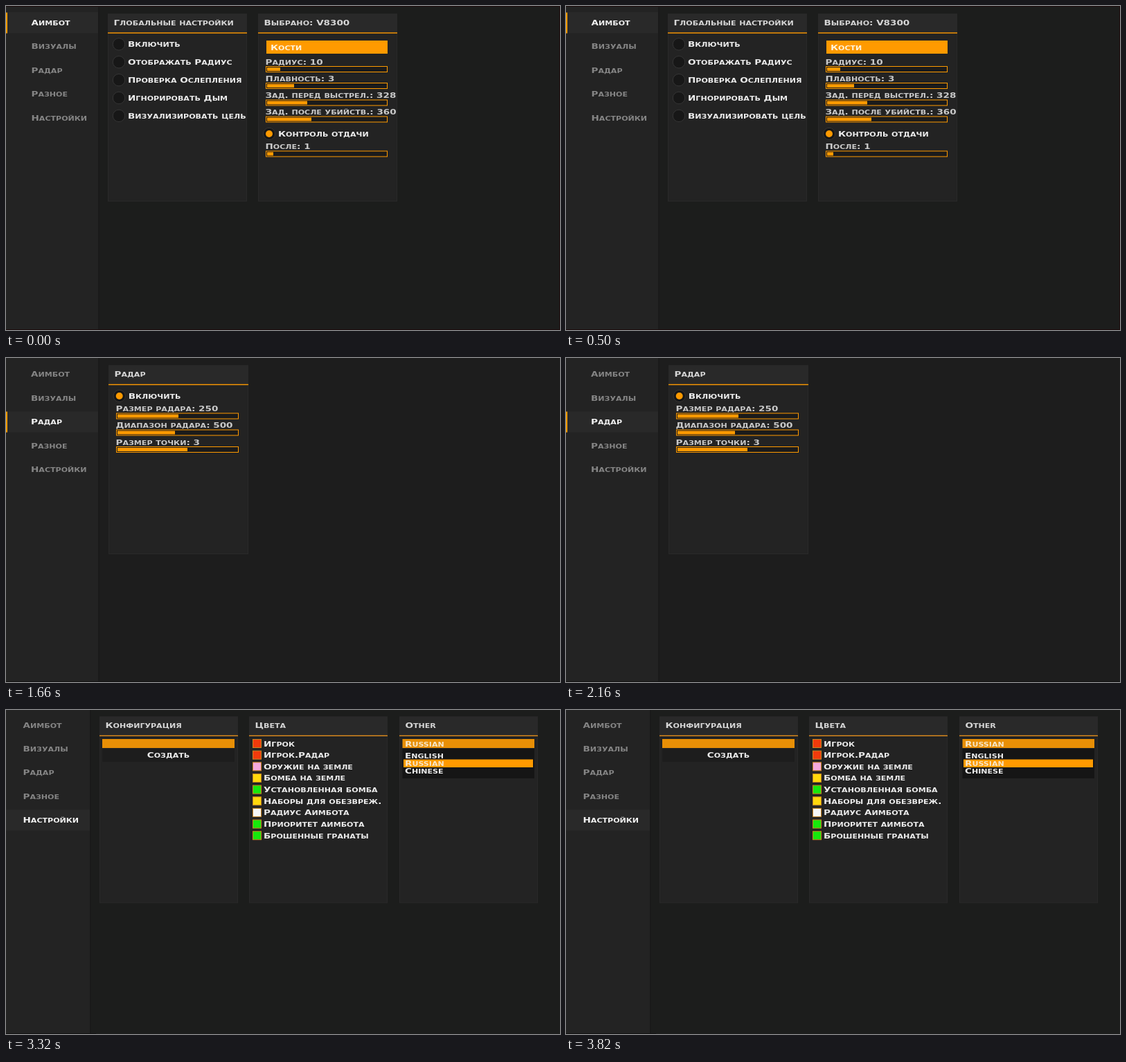
Animation of 800x469 px, one loop 4150 ms. Source, as an HTML page:

```html
<!DOCTYPE html>
<html lang="ru">
<head>
<meta charset="utf-8">
<title>Меню настроек</title>
<style>
html, body { margin: 0; width: 100%; height: 100%; overflow: hidden; background: #1d1d1d; }
svg { display: block; width: 100vw; height: 100vh; }
text { font: bold 11px "DejaVu Sans", sans-serif; white-space: pre; }
.low { font-size: 9px; text-transform: uppercase; }
</style>
</head>
<body>
<svg id="stage" viewBox="0 0 800 469" preserveAspectRatio="none"></svg>
<script>
const HOLD = 830;
const WIDE = 1.23;
const ORANGE = '#ff9a00';
const MENU = ['Аимбот', 'Визуалы', 'Радар', 'Разное', 'Настройки'];
const RED = '#f03a0c', YELLOW = '#ffd80c', GREEN = '#18e80c';

const rect = (x, y, w, h, fill, extra = '') =>
  `<rect x="${x}" y="${y}" width="${w}" height="${h}" fill="${fill}" ${extra}/>`;

// Wide small capitals, centred vertically on y
function label(x, y, str, fill = '#ececec', anchor = 'start') {
  const runs = str.split(/([а-яёa-z]+)/).filter(Boolean)
    .map(s => `<tspan${/[а-яёa-z]/.test(s) ? ' class="low"' : ''}>${s}</tspan>`).join('');
  return `<text transform="translate(${x} ${y + 4}) scale(${WIDE} 1)" fill="${fill}" text-anchor="${anchor}">${runs}</text>`;
}

function radio(x, y, str, on) {
  return `<circle cx="${x}" cy="${y}" r="8.7" fill="#171717" stroke="#353535"/>` +
    (on ? `<circle cx="${x}" cy="${y}" r="5" fill="${ORANGE}"/>` : '') +
    label(x + 13, y, str);
}

const radios = (x, y, names) => names.map((s, i) => radio(x, y + i * 25.9, s)).join('');

function slider(x, y, w, fill, str) {
  return label(x - .5, y - 6.5, str, '#c9c9c9') +
    rect(x + .5, y + .5, w - 1, 8, '#1b1b1b', `stroke="${ORANGE}"`) +
    rect(x + 2, y + 2, fill, 5, ORANGE);
}

function panel(x, y, w, bottom, line, title, tone = ORANGE) {
  return rect(x + .5, y + .5, w - 1, bottom - y - 1, '#232323', 'stroke="#292929"') +
    rect(x, y, w, line - y, '#292929') +
    rect(x, line - .7, w, 1.4, tone) +
    label(x + 8.5, y + 12.5, title, '#d6d6d6');
}

function sidebar(w, x, y, active, bar) {
  const step = 34.4;
  const mid = y + active * step;
  return rect(0, 0, w, 469, '#232323') +
    rect(w, 0, 2, 469, '#1a1a1a') +
    rect(0, mid - 15, w, 30.5, '#292929') +
    (bar ? rect(0, mid - 14.5, 2, 30, ORANGE) : '') +
    MENU.map((s, i) => label(x, y + i * step, s, i === active ? '#f2f2f2' : '#858585')).join('');
}

const swatch = (x, y, color, str) =>
  rect(x + .5, y - 6, 12, 12, color, 'stroke="#c98522"') + label(x + 16, y, str);

function aimbot() {
  return rect(0, 0, 800, 469, '#1c1d1c') +
    sidebar(133, 36.5, 24, 0, true) +
    panel(147, 11, 201, 283, 39, 'Глобальные настройки') +
    radios(163, 55.3, ['Включить', 'Отображать Радиус', 'Проверка Ослепления',
      'Игнорировать Дым', 'Визуализировать цель']) +
    panel(364, 11, 201, 283, 39, 'Выбрано: V8300') +
    rect(376, 50, 175, 19, ORANGE) + label(382, 59.5, 'Кости', '#fff4dc') +
    slider(375, 87, 176, 19, 'Радиус: 10') +
    slider(375, 111, 176, 39, 'Плавность: 3') +
    slider(375, 135.5, 176, 58, 'Зад. перед выстрел.: 328') +
    slider(375, 159.5, 176, 64, 'Зад. после убийств.: 360') +
    radio(380, 185, 'Контроль отдачи', true) +
    slider(375, 209.5, 176, 9, 'После: 1') +
    rect(0, 0, 800, 1, '#1c0c0c') + rect(0, 468, 800, 1, '#1c0c0c') + rect(799, 0, 1, 469, '#1c0c0c');
}

function visuals() {
  return rect(0, 0, 800, 469, '#1d1d1d') +
    rect(782, 0, 1, 463, '#262626') + rect(121, 462, 662, 1, '#262626') +
    sidebar(121, 24.5, 21, 1) +
    panel(135, 8.5, 199, 277.5, 36.3, 'Игроки', '#d08238') +
    radios(150.5, 52, ['Бокс', 'Скелет', 'Здоровье', 'Имя игрока', 'Оружие',
      'Направление взгляда', 'Линия к врагу']) +
    panel(350, 8.5, 199, 277.5, 36.3, 'Мир', '#d08238') +
    radios(366, 52, ['Оружие на земле', 'Бомба на земле', 'Установленная бомба',
      'Наборы для обезвреж.', 'Брошенные гранаты']) +
    rect(0, 468, 800, 1, '#121212');
}

function radar() {
  return rect(0, 0, 800, 469, '#1d1d1d') +
    sidebar(133, 36, 23.3, 2, true) +
    panel(148, 10.5, 202, 284, 38.5, 'Радар') +
    radio(163.7, 55, 'Включить', true) +
    slider(159, 79.5, 177, 88, 'Размер радара: 250') +
    slider(159, 103.5, 177, 83, 'Диапазон радара: 500') +
    slider(159, 128, 177, 101, 'Размер точки: 3') +
    rect(0, 468, 800, 1, '#121212');
}

function misc() {
  return rect(0, 0, 800, 469, '#1d1d1d') +
    sidebar(130, 32, 23, 3) +
    panel(144, 10, 202, 284, 38.2, 'Визуальные', '#d68428') +
    radios(159.3, 54.5, ['Наблюдатели', 'Прицел отдачи']) +
    panel(362.5, 10, 202.5, 284, 38.2, 'Память', '#d68428') +
    `<g clip-path="url(#edge)">${radios(378.5, 54.5, ['Откл. ослепление (Риск', 'Ночной режим'])}</g>` +
    rect(0, 468, 800, 1, '#121212');
}

function settings() {
  const colors = [[RED, 'Игрок'], [RED, 'Игрок.Радар'], ['#f3a9dd', 'Оружие на земле'],
    [YELLOW, 'Бомба на земле'], [GREEN, 'Установленная бомба'], [YELLOW, 'Наборы для обезвреж.'],
    ['#f6f6f6', 'Радиус Аимбота'], [GREEN, 'Приоритет аимбота'], [GREEN, 'Брошенные гранаты']];
  return rect(0, 0, 800, 469, '#1c1d1c') +
    sidebar(121, 24.5, 21.5, 4) +
    panel(135, 9.5, 200, 279.5, 37.3, 'Конфигурация', '#e08c1c') +
    rect(139, 42, 191, 13, '#e88f06') +
    rect(139, 56, 191, 19, '#1d1d1d') +
    label(234.5, 65.3, 'Создать', '#ececec', 'middle') +
    panel(351, 9.5, 200, 279.5, 37.3, 'Цвета', '#e08c1c') +
    colors.map(([c, s], i) => swatch(356, 48.5 + i * 16.65, c, s)).join('') +
    panel(568, 9.5, 200, 279.5, 37.3, 'Other', '#e08c1c') +
    rect(572.5, 42, 190.5, 13, '#e88f06') +
    label(576, 48.7, 'Russian', '#f6e6c8') +
    rect(572.5, 56, 190.5, 43, '#151515') +
    rect(574, 71.5, 187, 11.5, ORANGE) +
    label(576, 66.3, 'English') +
    label(576, 77.3, 'Russian', '#f6e6c8') +
    label(576, 88.3, 'Chinese') +
    rect(0, 468, 130, 1, '#121212');
}

const stage = document.getElementById('stage');
stage.innerHTML = '<defs><clipPath id="edge"><rect x="362" y="10" width="204" height="274"/></clipPath></defs>' +
  [aimbot, visuals, radar, misc, settings].map(draw => `<g class="page">${draw()}</g>`).join('');
const pages = [...stage.querySelectorAll('.page')];
const start = performance.now();

function show(time) {
  const now = Math.floor(time / HOLD) % pages.length;
  pages.forEach((page, i) => page.setAttribute('display', i === now ? 'inline' : 'none'));
}

function tick() {
  show(performance.now() - start);
  requestAnimationFrame(tick);
}
tick();
</script>
</body>
</html>
```
